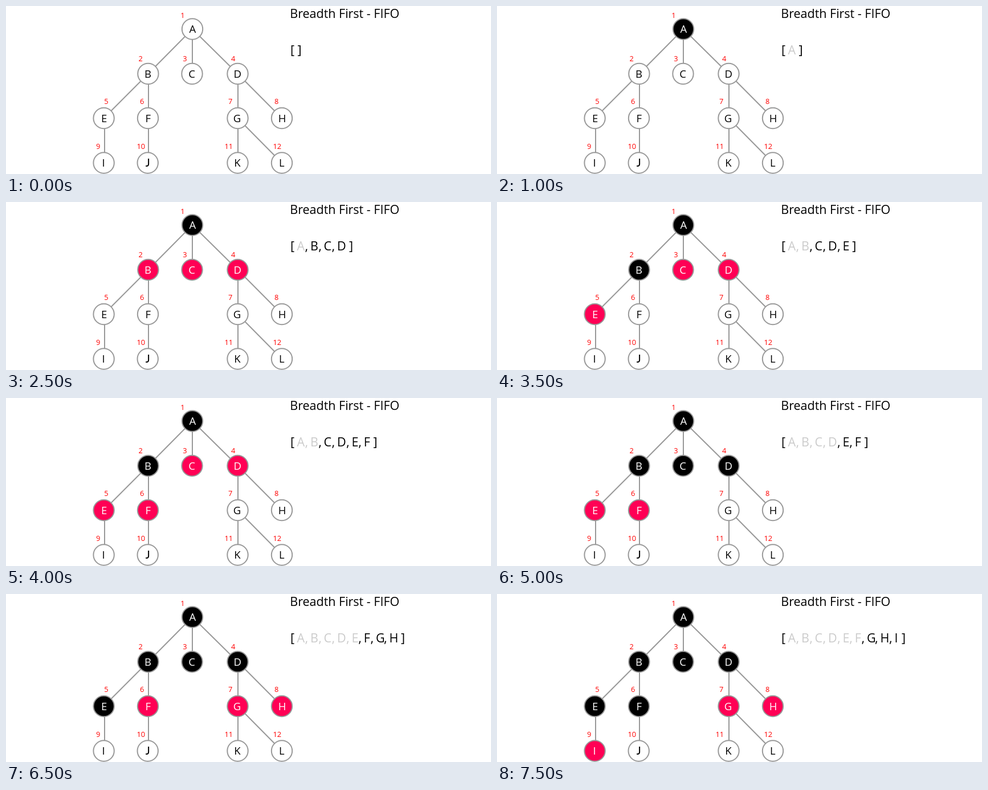
These frames come from a looping animation (851 px wide and 295 px high, 8 s). An HTML page with a canvas:

```html
<!DOCTYPE html>
<html lang="en">
<head>
<meta charset="utf-8">
<title>Breadth First</title>
<style>
html, body { margin: 0; width: 851px; height: 295px; overflow: hidden; background: #fff; }
canvas { display: block; }
</style>
</head>
<body>
<canvas id="stage" width="851" height="295"></canvas>
<script>
const ctx = document.getElementById('stage').getContext('2d');
const SANS = '"Open Sans", "Noto Sans", sans-serif';
const GREY = '#999', PINK = '#ff0055', FADED = '#ccc', RED = '#f00';
const STEP = 500;
const RADIUS = 18.2;

// Uppercase enqueues a node, lowercase marks it visited.
const OPS = 'AaBCDbEFcdGHeIf';
const ROWS = [40.5, 119, 197, 275.5];

// name: [circle x, row, letter x, number x, parent]
const NODES = {
  A: [327, 0, 327.3, 306.3, ''],
  B: [249.4, 1, 248.9, 232.4, 'A'],
  C: [326.5, 1, 326, 310.3, 'A'],
  D: [406.5, 1, 406.2, 395, 'A'],
  E: [171.6, 2, 172.2, 172.3, 'B'],
  F: [249, 2, 249.2, 235, 'B'],
  G: [406.5, 2, 405.6, 390, 'D'],
  H: [484, 2, 484.5, 471, 'D'],
  I: [171.6, 3, 171, 158, 'E'],
  J: [248.7, 3, 248.7, 229.5, 'F'],
  K: [406.5, 3, 406, 383.5, 'G'],
  L: [484, 3, 483.7, 468.5, 'G']
};
const NAMES = Object.keys(NODES);
const NUMBER_Y = [21.2, 97, 172, 251];

// Left edge of each queue slot
const SLOTS = [510.6, 534, 557.6, 581, 606.4, 627.8, 649, 672.5, 697.5, 714.5];
const QUEUE_Y = 84.8;

function write(str, x, y, size, color, align = 'left', family = SANS) {
  ctx.font = '500 ' + size + 'px ' + family;
  ctx.fillStyle = color;
  ctx.textAlign = align;
  ctx.fillText(str, x, y);
}

function drawEdge(name) {
  const [x, row, , , parent] = NODES[name];
  if (!parent) return;
  const [px, prow] = NODES[parent];
  // Vertical edges sit on whole pixels
  const straight = Math.abs(px - x) < 2;
  const snapped = Math.ceil(x + 0.5);
  ctx.beginPath();
  ctx.moveTo(straight ? snapped : px, ROWS[prow]);
  ctx.lineTo(straight ? snapped : x, ROWS[row]);
  ctx.stroke();
}

function drawNode(name, index, fill) {
  const [x, row, letterX, numberX] = NODES[name];
  ctx.beginPath();
  ctx.arc(x, ROWS[row], RADIUS, 0, Math.PI * 2);
  ctx.fillStyle = fill;
  ctx.fill();
  ctx.stroke();
  // Lato's J stays on the baseline
  const family = name === 'J' ? 'Lato, sans-serif' : SANS;
  write(name, letterX, ROWS[row] + 6.6, 18.5, fill === '#fff' ? '#000' : '#fff', 'center', family);
  write(String(index + 1), numberX, NUMBER_Y[row], 12.8, RED);
}

function drawQueue(queue, done) {
  write('[', 499, QUEUE_Y, 21.5, '#000');
  queue.forEach((name, i) => {
    const color = done.has(name) ? FADED : '#000';
    if (i) write(',', SLOTS[i] - 9.2, QUEUE_Y, 21.5, color);
    write(name, SLOTS[i], QUEUE_Y, 21.5, color);
  });
  const end = queue.length ? SLOTS[queue.length] + 2.6 : 518.5;
  write(']', end, QUEUE_Y, 21.5, '#000', 'right');
}

function draw(time) {
  const count = Math.floor(time / STEP) % (OPS.length + 1);
  const ops = [...OPS.slice(0, count)];
  const queue = ops.filter(c => c < 'a');
  const done = new Set(ops.filter(c => c >= 'a').map(c => c.toUpperCase()));

  ctx.fillStyle = '#fff';
  ctx.fillRect(0, 0, 851, 295);
  ctx.strokeStyle = GREY;
  ctx.lineWidth = 2;
  NAMES.forEach(drawEdge);
  NAMES.forEach((name, i) => {
    const fill = done.has(name) ? '#000' : queue.includes(name) ? PINK : '#fff';
    drawNode(name, i, fill);
  });
  write('Breadth First - FIFO', 498.2, 20.8, 21.5, '#000');
  drawQueue(queue, done);
}

const start = performance.now();
function tick() {
  draw(performance.now() - start);
  requestAnimationFrame(tick);
}
tick();
</script>
</body>
</html>
```
